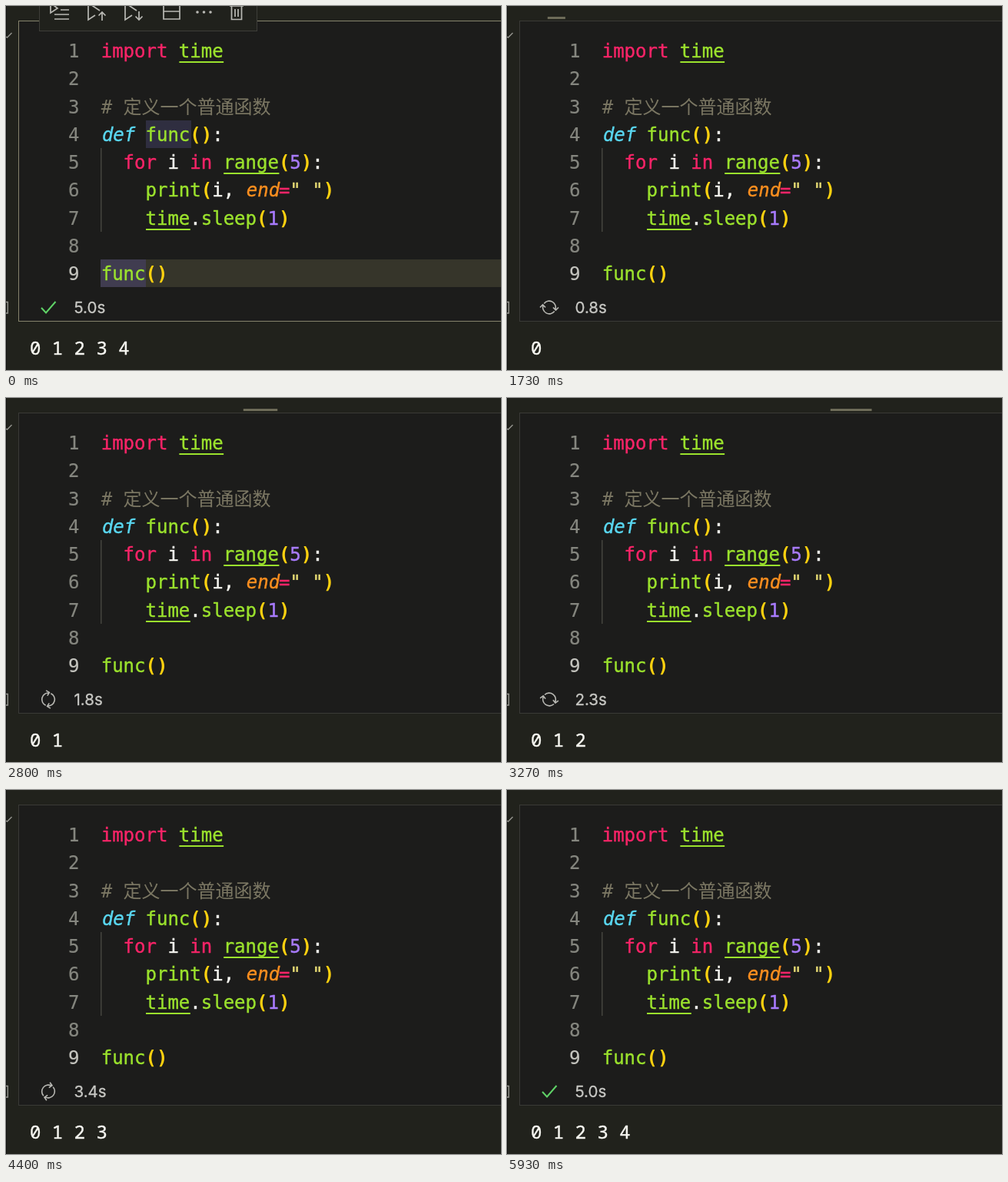
These frames come from a looping animation (644 by 474 pixels, 6.73 s). An HTML page:

```html
<!DOCTYPE html>
<html lang="zh">
<head>
<meta charset="utf-8">
<title>Notebook cell run</title>
<style>
  html, body { margin: 0; width: 100%; height: 100%; overflow: hidden; background: #21221c; }
  svg { display: block; width: 644px; height: 474px; }
  text {
    white-space: pre; color: #f8f8f2;
    font: 24px "DejaVu Sans Mono", "Noto Sans CJK SC", "Noto Sans CJK", monospace;
  }
  text, tspan { fill: currentColor; stroke: currentColor; stroke-width: .4; }
  #code rect { fill: currentColor; }
  .kw { color: #f92468; }
  .fn { color: #9be22d; }
  .def { color: #5ad8f2; font-style: italic; }
  .arg { color: #fd8f1f; font-style: italic; }
  .num { color: #a97bff; }
  .str { color: #e6db74; }
  .par { color: #ffd10f; font-weight: bold; stroke: none; }
  .com { color: #7b7763; stroke: none; }
  .ln { color: #85867f; stroke-width: .2; }
  .ln.on { color: #c4c4be; }
  #timer { font: 20.5px Inter, "Liberation Sans", sans-serif; color: #c9c9c5; stroke-width: .3; }
  #out { font-family: "Noto Sans Mono", "DejaVu Sans Mono", monospace; font-weight: 500; }
  .icon { fill: none; stroke: #b9b9b4; stroke-width: 1.7; }
  #edge { stroke: #94948e; stroke-width: 1.4; }
  #done { stroke: #5fd267; stroke-width: 2; }
  #spin { stroke-width: 1.6; }
</style>
</head>
<body>
<svg viewBox="0 0 644 474">
  <rect width="644" height="474" fill="#21221c"/>
  <rect width="1" height="474" fill="#121310"/>
  <path id="edge" class="icon" d="M0 40L1.500 41L7.500 35M0 385.500H2.300V400H0"/>
  <rect id="cell" x="16.500" y="19.500" width="640" height="391" fill="#1c1c1b"/>
  <rect id="bar" y="14" height="3" fill="#6d6b58"/>

  <g id="toolbar">
    <rect x="43.500" y="-5" width="283" height="37.500" fill="#20211c" stroke="#3e3e39"/>
    <g class="icon">
      <path d="M58 -4V9L67 3ZM71 -1H82M71 5H82M63 11H82M63 17H82"/>
      <path d="M107 -4V18L116 12M107 -4L122 6M125 19V8M120.500 12.500L125 8L129.500 12.500"/>
      <path d="M155 -4V18L164 12M155 -4L170 6M173 7V18M168.500 13.500L173 18L177.500 13.500"/>
      <path d="M205 -4V17H226V-4M205 7H226"/>
      <path d="M291 0H309M293.500 0V17.500H306.500V0M298 4V14M302 4V14"/>
    </g>
    <g fill="#b9b9b4">
      <circle cx="249" cy="8" r="1.800"/><circle cx="257.500" cy="8" r="1.800"/><circle cx="266" cy="8" r="1.800"/>
    </g>
  </g>

  <rect id="row" x="123" y="330" width="521" height="36" fill="#36352a"/>
  <g id="words">
    <rect x="182" y="149" width="59" height="36" fill="#2f2e40"/>
    <rect id="call" x="123" y="330" width="59" height="36"/>
  </g>
  <rect x="123" y="185" width="1.500" height="109" fill="#44453f"/>
  <g id="code"></g>
  <rect id="caret" x="123" y="330" width="2" height="36" fill="#f8f8f0"/>

  <path id="done" class="icon" d="M46 393L52 399.500L64.500 385"/>
  <g id="wait" class="icon">
    <path d="M47.500 386.500A9.300 9.300 0 1 1 46 394M46.500 382V387.500H52M55 386.500V393L59.500 396.500"/>
  </g>
  <g id="spin" class="icon">
    <path id="half" d="M-8.400 1.200A8.500 8.500 0 0 1 7.600 -3.700M8.500 -8.500V-3.500H3.500"/>
    <use href="#half" transform="rotate(180)"/>
  </g>
  <text id="timer" x="88.500" y="400"></text>
  <text id="out" x="31" y="454"></text>
</svg>
<script>
  const $ = id => document.getElementById(id);
  const LOOP = 6730, FPS = 15, CHAR = 14.45, LEFT = 123.7;
  const START = 14, END = 89;            // run start and end, in picture steps
  const baseline = i => 67 + i * 36.25;

  // Each line: indent, then "class|text" tokens; a class ending in _ is underlined.
  const lines = [
    [0, "kw|import ", "fn_|time"],
    [0],
    [0, "com|# 定义一个普通函数"],
    [0, "def|def ", "fn|func", "par|()", "|:"],
    [2, "kw|for ", "|i ", "kw|in ", "fn_|range", "par|(", "num|5", "par|)", "|:"],
    [4, "fn|print", "par|(", "|i, ", "arg|end", "kw|=", 'str|" "', "par|)"],
    [4, "fn_|time", "|.", "fn|sleep", "par|(", "num|1", "par|)"],
    [0],
    [0, "fn|func", "par|()"]
  ];
  const slanted = ["def", "arg"];

  $("code").innerHTML = lines.map(([indent, ...tokens], i) => {
    const y = baseline(i);
    let col = indent, spans = "", marks = "";
    for (const token of tokens) {
      const [cls, text] = token.split("|");
      const name = cls.replace("_", "");
      const x = LEFT + col * CHAR;
      spans += `<tspan class="${name}" x="${x + (slanted.includes(name) ? 1.2 : 0)}">${text}</tspan>`;
      if (name !== cls)
        marks += `<rect class="${name}" x="${x + 0.5}" y="${Math.round(y) + 5}" width="${text.length * CHAR}" height="2"/>`;
      col += text.length;
    }
    return `<text class="ln${i === 8 ? " on" : ""}" x="81" y="${y}">${i + 1}</text>` +
      `<text y="${y}">${spans}</text>${marks}`;
  }).join("");

  const show = (id, on) => $(id).style.display = on ? "" : "none";

  function draw(t) {
    const step = Math.floor(t * FPS / 1000 + 0.06);
    const ms = step * 1000 / FPS;
    const focused = step < 13, running = step >= START && step < END;

    show("toolbar", focused);
    show("row", focused);
    show("words", step < 17);
    show("caret", step >= 4 && step < 11);
    $("cell").setAttribute("stroke", focused ? "#85836c" : "#3a3a36");
    $("call").setAttribute("fill", focused ? "#403c50" : "#2f2e40");

    show("done", focused || step >= END);
    show("wait", step === 13);
    show("spin", running);
    $("spin").setAttribute("transform", `translate(55 392.500) rotate(${(ms - 2295) * 0.24})`);

    const secs = running ? Math.floor((ms - 920) / 100) / 10 : 5;
    $("timer").textContent = secs.toFixed(1) + "s";
    const count = step < 17 ? 5 : Math.min(5, Math.floor((step - 17) / 15) + 1);
    $("out").textContent = [...Array(count).keys()].join(" ");

    // Indeterminate bar: crosses in 4 s, three times as wide halfway.
    const since = ms - 1580;
    show("bar", running && since >= 0);
    if (since >= 0) {
      const p = since % 4000 / 2000, w = 20;
      const scale = p < 1 ? 1 + 2 * p : 5 - 2 * p;
      const mid = 16 + w / 2 + w * (p < 1 ? 25 * p : 25 + 24 * (p - 1));
      $("bar").setAttribute("x", mid - w * scale / 2);
      $("bar").setAttribute("width", w * scale);
    }
  }

  const begin = performance.now();
  function tick() {
    draw((performance.now() - begin) % LOOP);
    requestAnimationFrame(tick);
  }
  tick();
</script>
</body>
</html>
```
